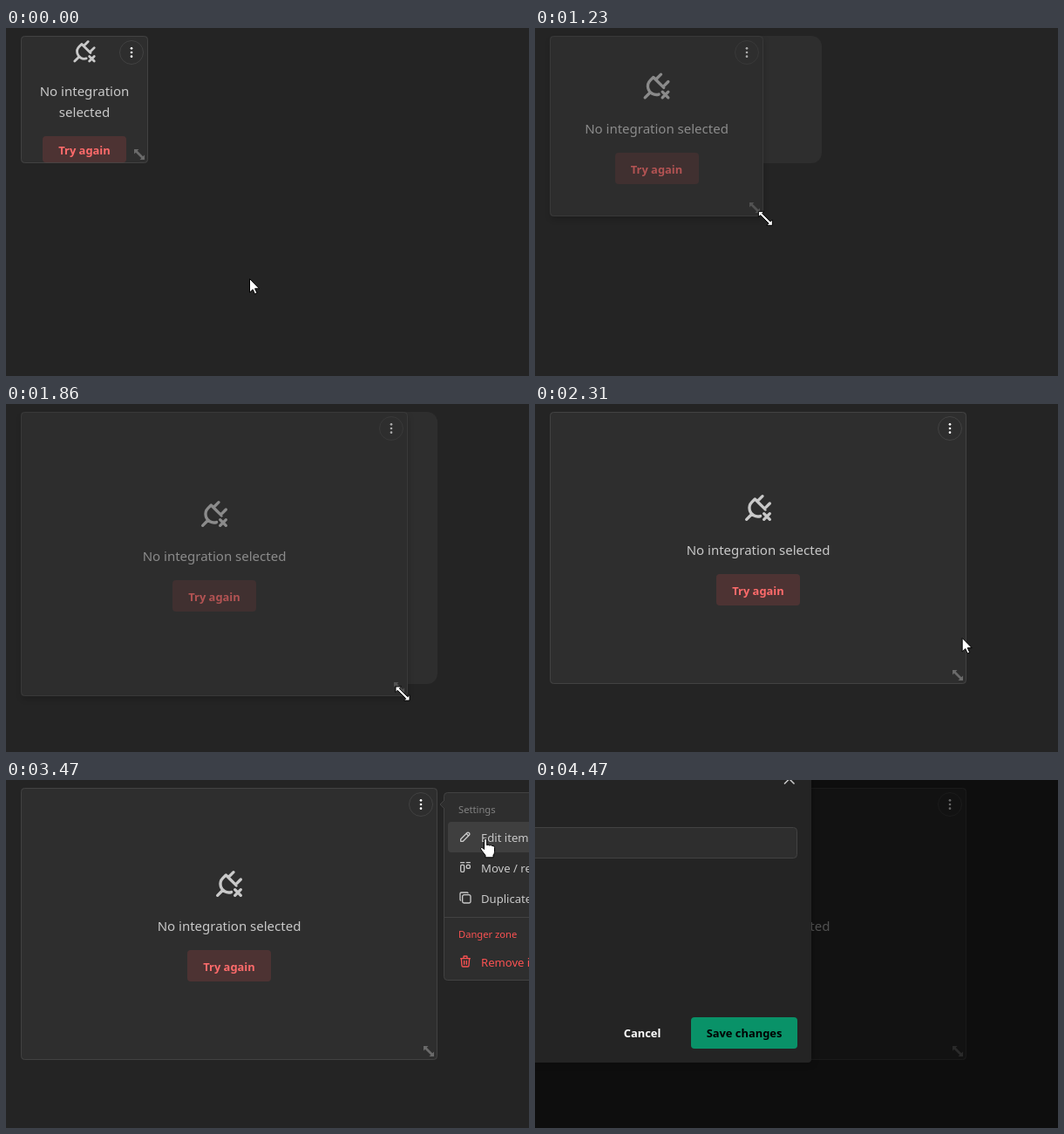
An HTML page with a canvas that plays this animation: 600x399 px, repeating every 4880 ms.

```html
<!DOCTYPE html>
<html lang="en">
<head>
<meta charset="utf-8">
<title>Resizing a dashboard item</title>
<style>
html, body { margin: 0; width: 100%; height: 100%; overflow: hidden; background: #242424; }
canvas { display: block; width: 600px; height: 399px; }
</style>
</head>
<body>
<canvas id="stage" width="600" height="399"></canvas>
<script>
const ctx = document.getElementById('stage').getContext('2d');
const LOOP = 4880;
const BG = '#242424', PANEL = '#2e2e2e', LINE = '#424242', TEXT = '#c9c9c9', RED = '#fa5252';
const CARD = { x: 17, y: 9 }, CELL = 146, GAP = 20;

// Icons on a 24 unit grid
const ICONS = {
  plug: 'M13.55 17.733a5.806 5.806 0 0 1-7.356-4.052a5.81 5.81 0 0 1 1.537-5.627l2.054-2.054l7.165 7.165M4 20l3.5-3.5M15 4l-3.5 3.5M20 9l-3.5 3.5M16 16l4 4M20 16l-4 4',
  pencil: 'M4 20h4l10.5-10.5a2.828 2.828 0 1 0-4-4l-10.5 10.5v4M13.5 6.5l4 4',
  board: 'M4 4h6M14 4h6M4 10a2 2 0 0 1 2-2h2a2 2 0 0 1 2 2v8a2 2 0 0 1-2 2h-2a2 2 0 0 1-2-2zM14 10a2 2 0 0 1 2-2h2a2 2 0 0 1 2 2v2a2 2 0 0 1-2 2h-2a2 2 0 0 1-2-2z',
  copy: 'M7 9.7a2.7 2.7 0 0 1 2.7-2.7h8.6a2.7 2.7 0 0 1 2.7 2.7v8.6a2.7 2.7 0 0 1-2.7 2.7h-8.6a2.7 2.7 0 0 1-2.7-2.7zM4 16.7a2 2 0 0 1-1-1.7v-10c0-1.1.9-2 2-2h10c.75 0 1.16.4 1.5 1',
  trash: 'M4 7h16M10 11v6M14 11v6M5 7l1 12a2 2 0 0 0 2 2h8a2 2 0 0 0 2-2l1-12M9 7v-3a1 1 0 0 1 1-1h4a1 1 0 0 1 1 1v3'
};
const CURSORS = {
  arrow: 'M.5.5v15.7l3.6-3.4l2.4 5.3l2.5-1.1l-2.4-5.2h4.9z',
  hand: 'M-1.5 1.8a1.6 1.6 0 0 1 3.2 0v5.9q1.5-1.2 3 .3q1.6-1 2.9.5q2.9-.6 2.9 1.9v5q0 2-1.5 3.6v2.8h-9v-2.4l-5-6.5q-1.2-2 .6-2.4q1.2-.2 2.9 2z',
  resize: 'M-8-8h6.5l-2.2 2.2l9.5 9.5l2.2-2.2v6.5h-6.5l2.2-2.2l-9.5-9.5l-2.2 2.2z'
};
const HANDLE = 'M-6-6h5.5l-1.8 1.8l6.5 6.5l1.8-1.8v5.5h-5.5l1.8-1.8l-6.5-6.5l-1.8 1.8z';

const clamp = v => Math.max(0, Math.min(1, v));
const lerp = (a, b, p) => a + (b - a) * p;
const ramp = (t, from, to) => clamp((t - from) / (to - from));
const ease = p => lerp(p, p * p * (3 - 2 * p), 0.4);

// Progress that jumps in n equal parts: 1/n at `from`, 1 at `to`
function steps(t, from, to, n) {
  if (t < from) return 0;
  return Math.min(n, Math.floor((t - from) / (to - from) * (n - 1)) + 1) / n;
}

function box(x, y, w, h, r, fill, stroke) {
  ctx.beginPath();
  const inset = stroke ? 0.5 : 0;
  ctx.roundRect(x + inset, y + inset, w - 2 * inset, h - 2 * inset, r);
  ctx.fillStyle = fill;
  ctx.fill();
  if (stroke) {
    ctx.lineWidth = 1;
    ctx.strokeStyle = stroke;
    ctx.stroke();
  }
}

function text(str, x, y, size, color, align = 'left', weight = 400) {
  ctx.font = `${weight} ${size}px "Noto Sans", "Open Sans", sans-serif`;
  ctx.textAlign = align;
  ctx.fillStyle = color;
  ctx.fillText(str, x, y);
}

function icon(name, cx, cy, size, color) {
  ctx.save();
  ctx.translate(cx, cy);
  ctx.scale(size / 24, size / 24);
  ctx.translate(-12, -12);
  ctx.lineWidth = 2;
  ctx.lineCap = ctx.lineJoin = 'round';
  ctx.strokeStyle = color;
  ctx.stroke(new Path2D(ICONS[name]));
  ctx.restore();
}

function shape(path, x, y, fill, outline) {
  ctx.save();
  ctx.translate(x, y);
  const p = new Path2D(path);
  ctx.fillStyle = fill;
  ctx.fill(p);
  if (outline) {
    ctx.lineWidth = 1;
    ctx.strokeStyle = outline;
    ctx.stroke(p);
  }
  ctx.restore();
}

function pointer(t) {
  if (t < 810) {
    const p = steps(t, 150, 660, 8), e = ease(p);
    return { x: lerp(279, 159, e), y: lerp(287, 155, e), kind: p < 1 ? 'arrow' : 'resize' };
  }
  if (t < 1620) {
    const e = ease(steps(t, 1020, 1530, 9));
    return { x: lerp(156, 406, e), y: lerp(152, 305, e), kind: 'resize' };
  }
  if (t < 2070) {
    const p = steps(t, 1620, 1860, 4);
    return { x: lerp(406, 455, p), y: lerp(305, 332, p), kind: 'resize' };
  }
  if (t < 2990) {
    const p = steps(t, 2220, 2690, 8), e = ease(p), q = 1 - e;
    return {
      x: q * q * 455 + 2 * q * e * 555 + e * e * 481,
      y: lerp(332, 30, e),
      kind: p < 1 ? 'arrow' : 'hand'
    };
  }
  if (t < 4000) {
    const e = ease(steps(t, 2990, 3470, 8));
    const x = lerp(481, 550, e), y = lerp(30, 67, e);
    return { x, y, kind: x < 490 || y >= 48 ? 'hand' : 'arrow' };
  }
  const p = steps(t, 4000, 4400, 6);
  return { x: lerp(550, 620, p), y: lerp(67, 60, p), kind: p < 0.4 ? 'hand' : 'arrow' };
}

function cardSize(t, cur) {
  if (t < 1020) return { w: CELL, h: CELL };
  if (t >= 2070) return { w: 478, h: 312 };
  const [dx, dy] = t < 1530 ? [-2.5, -2] : [6, 3];
  return {
    w: Math.round(Math.max(CELL, cur.x + dx - CARD.x)),
    h: Math.round(Math.max(CELL, cur.y + dy - CARD.y))
  };
}

function drawPlaceholder(w, h) {
  const snap = v => Math.round((v + GAP) / (CELL + GAP)) * (CELL + GAP) - GAP;
  box(CARD.x, CARD.y, snap(w), snap(h), 12, PANEL);
}

function drawCard({ w, h }, dragging, hover, pressed) {
  const { x, y } = CARD, cx = x + w / 2;
  ctx.save();
  if (dragging) {
    ctx.shadowColor = 'rgba(0,0,0,.15)';
    ctx.shadowBlur = 6;
    ctx.shadowOffsetX = 1;
    ctx.shadowOffsetY = 4;
  }
  box(x, y, w, h, 4, PANEL);
  ctx.restore();

  ctx.save();
  ctx.globalAlpha = dragging ? 0.6 : 1;
  box(x, y, w, h, 4, PANEL, LINE);

  // Centred column; icon and button shrink when the card is too low
  const lines = w < 190 ? ['No integration', 'selected'] : ['No integration selected'];
  const textH = 24 * lines.length;
  const k = Math.min(1, (h - 2 - 32 - textH) / 76);
  const iconH = 40 * k, buttonH = 36 * k;
  let top = y + h / 2 - (iconH + buttonH + 32 + textH) / 2;
  icon('plug', cx, top + iconH / 2, iconH, TEXT);
  top += iconH + 16;
  lines.forEach((line, i) => text(line, cx, Math.round(top + 18.4 + 24 * i), 15, TEXT, 'center'));
  top = Math.round(top + textH + 16);
  box(Math.round(cx - 48), top, 96, buttonH, 4, 'rgba(250,82,82,.15)');
  text('Try again', cx, Math.round(top + buttonH / 2 + 5.5), 12.9, '#ff6b6b', 'center', 600);

  const bx = x + w - 19, by = 28 + (pressed ? 1 : 0);
  box(bx - 14, by - 14, 28, 28, 14, hover ? '#3b3b3b' : PANEL, hover ? '#3f3f3f' : LINE);
  ctx.fillStyle = '#fff';
  for (const dy of [-4.67, 0, 4.67]) {
    ctx.beginPath();
    ctx.arc(bx, by + dy, 1.33, 0, 7);
    ctx.fill();
  }
  shape(HANDLE, x + w - 10, y + h - 10, '#6a6a6a');
  ctx.restore();
}

function drawMenu(alpha, hoverEdit) {
  if (alpha <= 0) return;
  ctx.save();
  ctx.globalAlpha = alpha;
  box(502, 14, 200, 216, 4, PANEL, LINE);
  ctx.beginPath();
  ctx.moveTo(503, 23);
  ctx.lineTo(498, 28);
  ctx.lineTo(503, 33);
  ctx.fillStyle = PANEL;
  ctx.fill();
  ctx.strokeStyle = LINE;
  ctx.stroke();

  if (hoverEdit) box(507, 48, 190, 35, 4, '#3f3f3f');
  text('Settings', 519, 38, 11.2, '#828282');
  const item = (name, label, y, color) => {
    icon(name, 527, y, 16, color);
    text(label, 545, y + 6, 13.1, color);
  };
  item('pencil', 'Edit item', 65, TEXT);
  item('board', 'Move / resize', 100, TEXT);
  item('copy', 'Duplicate', 135, TEXT);
  ctx.fillStyle = LINE;
  ctx.fillRect(503, 157, 97, 1);
  text('Danger zone', 519, 181, 11.2, RED);
  item('trash', 'Remove item', 208, RED);
  ctx.restore();
}

function drawModal(p) {
  if (p <= 0) return;
  ctx.fillStyle = `rgba(0,0,0,${0.6 * p})`;
  ctx.fillRect(0, 0, 600, 399);
  ctx.save();
  ctx.globalAlpha = p;
  ctx.translate(0, -30 * (1 - p));
  ctx.save();
  ctx.shadowColor = 'rgba(0,0,0,.3)';
  ctx.shadowBlur = 10;
  box(-300, -60, 617, 384, 4, BG);
  ctx.restore();
  ctx.beginPath();
  ctx.moveTo(286, -7);
  ctx.lineTo(297.5, 4.5);
  ctx.moveTo(297.5, -7);
  ctx.lineTo(286, 4.5);
  ctx.lineWidth = 1.5;
  ctx.strokeStyle = TEXT;
  ctx.stroke();
  box(-280, 54, 581, 36, 4, PANEL, LINE);
  text('Cancel', 123, 295, 12.9, '#fff', 'center', 600);
  box(179, 272, 122, 36, 4, '#099268');
  text('Save changes', 240, 295, 12.9, '#000', 'center', 600);
  ctx.restore();
}

function draw(t) {
  const cur = pointer(t), size = cardSize(t, cur);
  const dragging = t >= 1020 && t < 2070;
  const hover = t >= 2690 && cur.x < 490;
  ctx.fillStyle = BG;
  ctx.fillRect(0, 0, 600, 399);
  if (dragging) drawPlaceholder(size.w, size.h);
  drawCard(size, dragging, hover, t >= 2840 && t < 2990);
  drawMenu(ramp(t, 2970, 3120) - ramp(t, 4000, 4150), cur.y >= 48);
  drawModal(ease(ramp(t, 4060, 4400)));
  shape(CURSORS[cur.kind], cur.x, cur.y, '#fff', '#000');
}

const start = performance.now();
function tick() {
  draw((performance.now() - start) % LOOP);
  requestAnimationFrame(tick);
}
tick();
</script>
</body>
</html>
```
